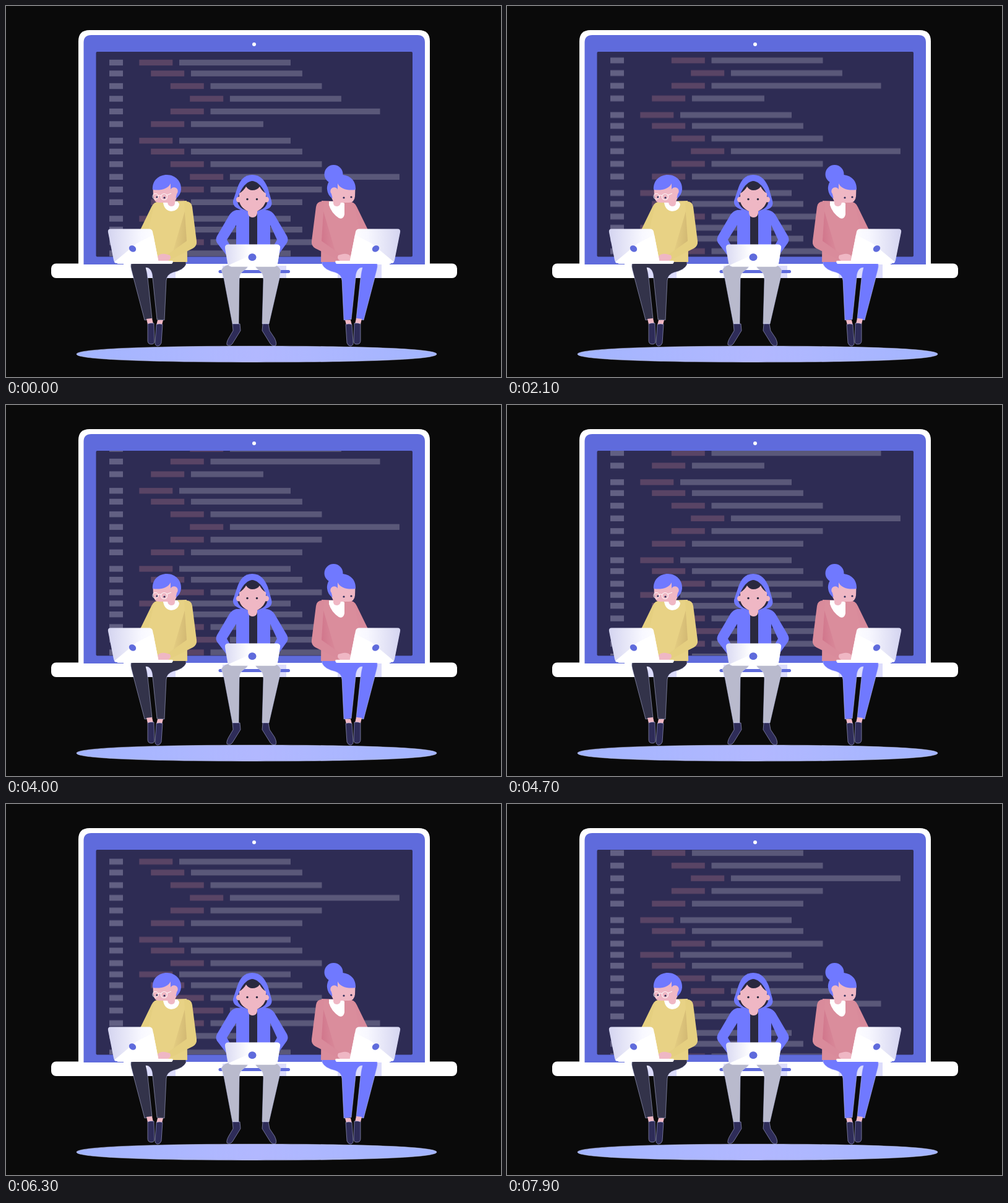
Write an HTML page that moves like this. It is 800x600 px and loops after 8000 ms.

```html
<!DOCTYPE html>
<html lang="en">
<head>
<meta charset="utf-8">
<title>Coding team</title>
<style>
  html, body { margin: 0; width: 100%; height: 100%; overflow: hidden; background: #0a0a0a; }
  svg { display: block; width: 800px; height: 600px; }
  #code { animation: scroll 8s steps(80, end) infinite; }
  @keyframes scroll { to { transform: translateY(-158.2px); } }
  .num { fill: #626083; }
  .tag { fill: #594465; }
  .bar { fill: #5a5879; }
  .man { --top: #e8d285; --sleeve: #e5cf80; --pants: #33334a; --fold: url(#foldMan); }
  .woman { --top: #da8d9c; --sleeve: #d98b9b; --pants: #7079ff; --fold: url(#foldWoman); }
  .top { fill: var(--top); }
  .sleeve { fill: var(--sleeve); }
  .pants { fill: var(--pants); }
  .fold { fill: var(--fold); }
  .skin { fill: #efb7c4; }
  .blue { fill: #7079ff; }
  .mark { fill: #5f6bdc; }
  .navy { fill: #2e2c58; }
  .dark { fill: #2a293f; }
  .halo { stroke: #cfd2ff; stroke-opacity: .6; stroke-width: .8; }
</style>
</head>
<body>
<svg viewBox="0 0 800 600">
  <defs>
    <clipPath id="screen"><rect x="146" y="74.6" width="511" height="330"/></clipPath>
    <linearGradient id="lid"><stop offset="0" stop-color="#d4d4f0"/><stop offset=".65" stop-color="#f8f8ff"/><stop offset="1" stop-color="#fff"/></linearGradient>
    <linearGradient id="lidMid"><stop offset="0" stop-color="#dadaf3"/><stop offset=".45" stop-color="#fff"/></linearGradient>
    <linearGradient id="foldMan" y1=".3" y2=".5"><stop offset="0" stop-color="#e8d285"/><stop offset="1" stop-color="#d2b873"/></linearGradient>
    <linearGradient id="foldWoman" y1=".3" y2=".5"><stop offset="0" stop-color="#da8d9c"/><stop offset="1" stop-color="#d1768c"/></linearGradient>
    <linearGradient id="floor"><stop offset="0" stop-color="#a3b5ff"/><stop offset=".5" stop-color="#b2b8ff"/><stop offset="1" stop-color="#a3b5ff"/></linearGradient>

    <g id="legs">
      <path class="pants halo" d="M202 417L270 409H284Q292 410 291 418Q287 427 270 431Q260 434 259 444L256 508L244 507L237 440Q236 423 226 423Q228 430 229 440L236 506L224 508L203 428Q201 421 202 417Z"/>
      <path class="skin" d="M227 506L236 505L238 514L229 515ZM245 508H254L252 516H243Z"/>
      <path class="navy halo" d="M229 514Q234 512 239 513L240 542Q240 547 235 547Q229 547 229 541ZM243 515Q248 513 253 515L251 545Q249 550 245 550Q240 549 241 543Z"/>
    </g>
    <g id="torso">
      <path class="sleeve" d="M248 316Q238 317 235 325L217 362H244L250 335Z"/>
      <path class="top" d="M240 319Q246 316 256 316L292 315L293 414H230V362Z"/>
      <path class="fold" d="M289 332L268 403L293 381Z"/>
      <path class="sleeve" d="M288 316Q300 315 301 325L308 380Q309 388 302 392L266 410L261 402L292 380Z"/>
    </g>
    <g id="computer">
      <path class="skin" d="M245 405Q249 400 257 401L265 403Q268 409 262 412H246Z"/>
      <path fill="#fff" d="M180 412H269Q271 414 268 417H180Z"/>
      <path fill="url(#lid)" d="M169 360.500H231Q236 360.500 237 365L247 416H180Q175 416 174 411L165 366Q164 360.500 169 360.500Z"/>
      <path fill="#fff" d="M175 414L211 384L238 370L247 416H180Q176 416 175 414Z"/>
      <ellipse class="mark" cx="204.500" cy="392.500" rx="6" ry="5" transform="rotate(35 204.500 392.500)"/>
    </g>
    <g id="head">
      <path class="skin" d="M237.500 294L238 308Q239 318 248 318H261Q262 324 268 324Q274 323 273 316L281 300L264 284Z"/>
      <path class="blue" d="M237 297C236 282 247 273 260 273C274 273 284 284 283 297Q282 306 275 311L266 299V287C262 296 249 299 237 297Z"/>
      <circle class="skin" cx="271.500" cy="299.500" r="6.200"/>
      <path class="skin" d="M264 298L276 304L273 316H262Z"/>
      <circle class="navy" cx="244" cy="309" r="1.600"/>
      <circle class="navy" cx="256" cy="310" r="1.600"/>
    </g>
  </defs>

  <rect width="800" height="600" fill="#0a0a0a"/>
  <path class="halo" fill="url(#floor)" d="M114 563C114 554 240 550 405 550S696 554 696 563S570 576 405 576S114 572 114 563Z"/>

  <path fill="#fff" d="M117 420V57Q117 39 135 39H667Q685 39 685 57V420Z"/>
  <rect x="73" y="416.500" width="656" height="23.500" rx="8" fill="#fff"/>
  <path class="mark" d="M125.500 418V59Q125.500 47 138 47H665Q677 47 677 59V418Z"/>
  <rect x="145.500" y="74" width="511.500" height="331.500" rx="2" fill="#2e2c54"/>
  <circle cx="401" cy="62" r="3" fill="#fff"/>
  <g clip-path="url(#screen)"><g id="code"></g></g>

  <path fill="#fff" d="M190 417H620V440H190Z"/>
  <path fill="#dcdcfb" d="M228 420H274V440H228ZM350 420H453V440H350ZM536 418H607V440H536Z"/>
  <path fill="#fff" d="M375 418H420V440H375Z"/>
  <rect class="mark" x="343.500" y="427" width="115.500" height="5" rx="2.500"/>

  <g class="man">
    <use href="#legs"/>
    <use href="#torso"/>
    <path fill="#fff" d="M254 318L262 316H277L280 320Q279 331 267 332Q256 331 254 318Z"/>
    <use href="#head"/>
    <g fill="none" stroke="#fff" stroke-opacity=".85" stroke-width="1.100">
      <circle cx="241.500" cy="308" r="4.500"/>
      <circle cx="255.500" cy="308.500" r="5"/>
      <path d="M246 307Q248 305 250.500 307M260 306L267 303"/>
    </g>
    <use href="#computer"/>
  </g>

  <g class="woman" transform="matrix(-1 0 0 1 802 0)">
    <circle class="blue" cx="272.500" cy="272" r="15"/>
    <use href="#legs"/>
    <use href="#torso"/>
    <path fill="#fff" d="M255 319L262 316H280V322Q276 335 264 343Q257 346 255 337Z"/>
    <use href="#head"/>
    <use href="#computer"/>
  </g>

  <g>
    <path class="halo" fill="#b9bacd" d="M348 427Q352 418 366 418H392Q391 424 384 428Q377 432 377 443L376 514H366L352 440ZM444 427Q440 418 428 418H402Q403 424 410 428Q416 432 416 443L414 514H425L442 440Z"/>
    <path class="navy halo" d="M366 514H378L379 525L366 546Q362 551 357 548Q356 544 360 537L367 525ZM415 514H424L426 525L434 537Q438 545 436 549Q431 551 427 546L414 525Z"/>
    <path class="blue" d="M372 330Q366 331 361 338L341 372Q338 378 341 383L357 404L366 394L357 378L372 354V390H427V354L438 378L429 394L439 404L454 383Q457 378 454 372L434 338Q429 331 422 330Z"/>
    <path class="dark" d="M393 334H406V388H393Z"/>
    <path class="blue" d="M398 273C385 273 378 282 374 294L367 315Q366 322 372 326L383 332H415L425 327Q431 323 429 315L423 294C418 282 411 273 398 273Z"/>
    <path class="dark" d="M398 283C387 284 379 297 374 312Q373 322 382 328L391 332H406L415 328Q424 322 422 312C418 297 409 284 398 283Z"/>
    <circle class="skin" cx="376.500" cy="313" r="4.500"/>
    <circle class="skin" cx="420.500" cy="313" r="4.500"/>
    <path class="skin" d="M377 303Q384 299 388 292Q392 298 398 298Q406 298 410 292Q413 299 420 303V313Q419 325 406 332V335Q405 342 398.500 342Q392 342 391 335V332Q377 325 377 313Z"/>
    <circle class="dark" cx="390" cy="312.500" r="1.700"/>
    <circle class="dark" cx="405.500" cy="312.500" r="1.700"/>
    <path fill="url(#lidMid)" d="M359 385.500H438Q444 386 443 392L439 416Q438 421.500 433 421.500H364Q359 421.500 358 416L354 392Q353 386 359 385.500Z"/>
    <path fill="#fff" d="M360 419L389 406L442 398L439 416Q438 421.500 433 421.500H364Z"/>
    <ellipse class="mark" cx="398" cy="406.300" rx="6.500" ry="6"/>
  </g>
</svg>
<script>
  const code = document.getElementById('code');
  const indents = [215.3, 234.2, 265.8, 297.2];
  const H = 9.4, CYCLE = 308.6;
  // Each line: centre y, indent level, bar length
  const lines = [
    [91.5, 0, 180], [109.1, 1, 180], [129.5, 2, 180], [150, 3, 180], [170.5, 2, 274], [191, 1, 117],
    [217.8, 0, 180], [235.4, 1, 180], [255.8, 2, 180], [276.3, 3, 274], [296.8, 2, 180], [317.3, 1, 180],
    [344, 0, 180], [361.6, 1, 180], [382, 2, 180]
  ];

  function block(type, x, y, w) {
    const r = document.createElementNS('http://www.w3.org/2000/svg', 'rect');
    r.setAttribute('class', type);
    Object.entries({ x, y, width: w, height: H }).forEach(([k, v]) => r.setAttribute(k, v));
    code.append(r);
  }

  for (const shift of [0, CYCLE]) {
    for (const [mid, level, length] of lines) {
      const x = indents[level], y = mid + shift - H / 2;
      block('num', 167, y, 22);
      block('tag', x, y, 54);
      block('bar', x + 64.7, y, length);
    }
  }
</script>
</body>
</html>
```
